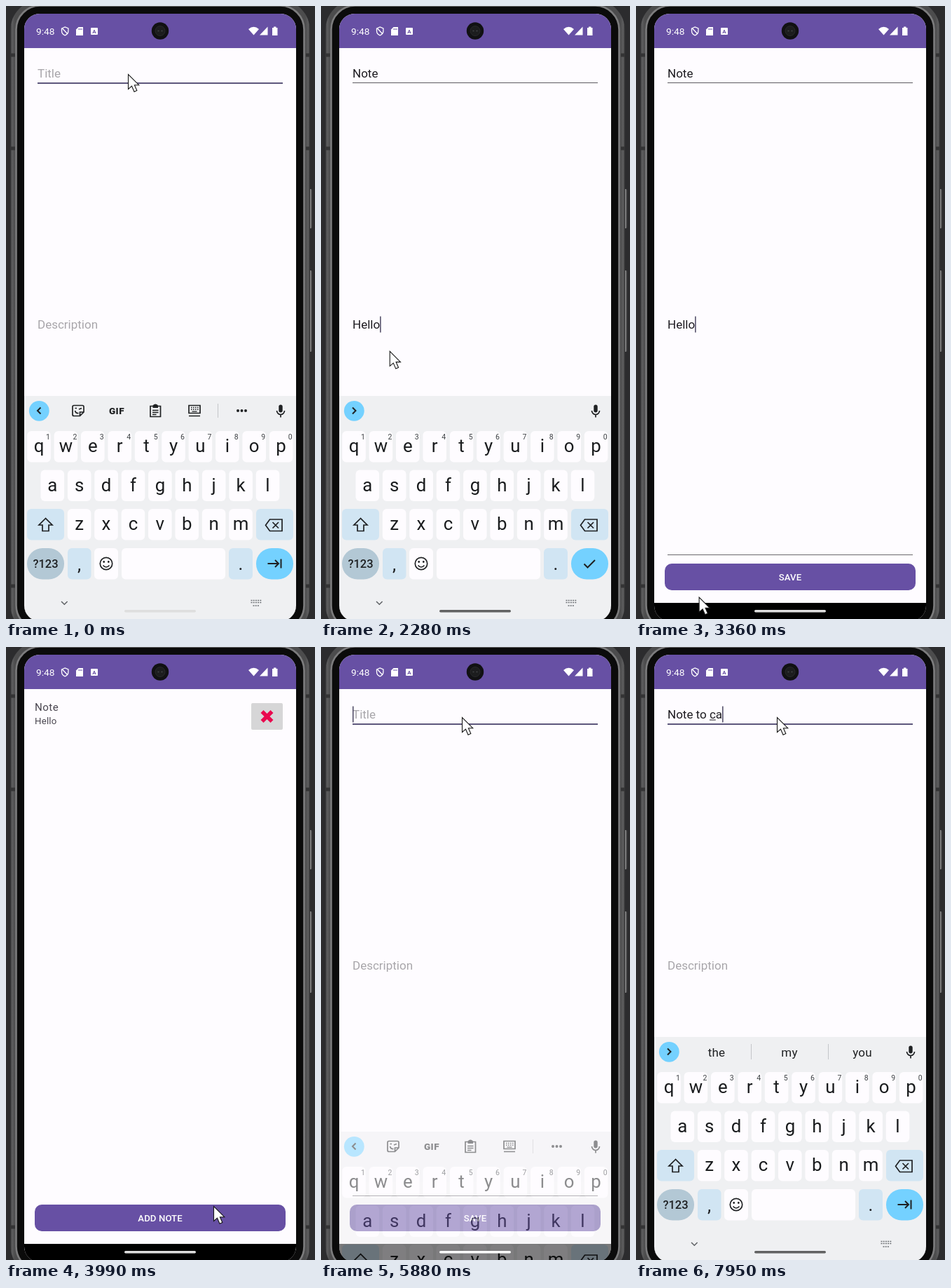
An HTML page that plays this animation: 441 px wide and 874 px high, repeating every 8000 ms.

```html
<!DOCTYPE html>
<html lang="en">
<head>
<meta charset="utf-8">
<title>Notes app</title>
<style>
  html, body { margin: 0; height: 100%; overflow: hidden; background: #2c2c2e; }
  svg { display: block; width: 441px; height: 874px; }
  text { font-family: Roboto, sans-serif; white-space: pre; }
  .mid { text-anchor: middle; }
  .field { font-size: 17px; }
  .btn { font-size: 13.2px; font-weight: 500; fill: #fff; letter-spacing: .1px; }
  .key { font-size: 25.8px; fill: #1a1c1e; }
  .num { font-size: 10.5px; fill: #3c4043; }
  .word { font-size: 17px; fill: #1f2123; letter-spacing: .2px; }
  .line { fill: none; stroke: #1f2123; stroke-width: 1.7; }
  .bold { stroke-width: 2; }
  .solid { fill: #1f2123; }
</style>
</head>
<body>
<svg viewBox="0 0 441 874">
  <defs>
    <linearGradient id="metal">
      <stop offset="0" stop-color="#2c2c2d"/>
      <stop offset=".006" stop-color="#5e5e5f"/>
      <stop offset=".016" stop-color="#4c4c4d"/>
      <stop offset=".984" stop-color="#4c4c4d"/>
      <stop offset=".994" stop-color="#5e5e5f"/>
      <stop offset="1" stop-color="#2c2c2d"/>
    </linearGradient>
    <linearGradient id="side">
      <stop offset="0" stop-color="#4a4a4b"/>
      <stop offset=".5" stop-color="#8a8a8b"/>
      <stop offset="1" stop-color="#303031"/>
    </linearGradient>
    <clipPath id="screen"><rect x="26" y="11" width="388" height="866" rx="22"/></clipPath>
  </defs>

  <!-- phone body -->
  <rect width="441" height="874" fill="#2c2c2e"/>
  <rect x="432" y="261" width="5" height="56" rx="2" fill="url(#side)"/>
  <rect x="432" y="377" width="5" height="116" rx="2" fill="url(#side)"/>
  <rect x="6" y="-9" width="428" height="906" rx="44" fill="url(#metal)"/>
  <path d="M7 70h6M7 203h6M7 827h6M428 70h6M428 203h6M428 827h6" stroke="#343435" stroke-width="5"/>
  <rect x="14.500" y="-.5" width="411" height="889" rx="34" fill="#0b0b0b" stroke="#7c7c7d" stroke-width="2.600"/>

  <g clip-path="url(#screen)">
    <rect x="26" y="11" width="388" height="866" fill="#fefcff"/>

    <g id="form">
      <text id="titleText" class="field" x="45" y="102"></text>
      <rect id="titleLine" x="45" width="350"/>
      <text id="descText" class="field" x="45" y="460"></text>
      <rect x="45" y="782" width="350" height="1" fill="#6b696d"/>
      <rect id="compose" height="1" fill="#1d1b20"/>
      <rect id="caret" width="1.5" height="23" fill="#4c4763"/>
      <rect x="41" y="795" width="358" height="38" rx="10" fill="#6750a4"/>
      <text class="btn mid" x="220" y="818.5">SAVE</text>
    </g>

    <g id="list">
      <rect x="26" y="60" width="388" height="800" fill="#fefcff"/>
      <text x="41" y="91" font-size="15.1" letter-spacing=".47" fill="#49454f">Note</text>
      <text x="41" y="110" font-size="13.2" letter-spacing=".25" fill="#49454f">Hello</text>
      <rect x="350" y="80" width="45" height="38" rx="2" fill="#d6d6d7"/>
      <path d="M365.5 92l14 14M379.5 92l-14 14" stroke="#e9084f" stroke-width="5.6"/>
      <rect x="41" y="795" width="358" height="38" rx="10" fill="#6750a4"/>
      <text class="btn mid" x="220" y="818.5">ADD NOTE</text>
    </g>
    <rect id="press" x="41" y="795" width="358" height="38" rx="10" fill="#fff" opacity=".18"/>

    <!-- status bar -->
    <rect x="26" y="11" width="388" height="49" fill="#6750a4"/>
    <text x="43" y="41" font-size="13.7" fill="#fff">9:48</text>
    <path d="M79.500 32l4.700-2 4.700 2v3.500c0 3-2 5.300-4.700 6.300-2.700-1-4.700-3.300-4.700-6.300zM80 31.500l8 8.500" fill="none" stroke="#fff" stroke-width="1.3"/>
    <path d="M103.500 30h6.500v12h-10v-8.500z" fill="#fff"/>
    <path d="M104 32v2M106 32v2M108 32v2" stroke="#6750a4"/>
    <rect x="121" y="31" width="10" height="10" rx="1" fill="#fff"/>
    <text class="mid" x="126" y="39" font-size="8" font-weight="700" fill="#6750a4">A</text>
    <path d="M346 33q7.500-6.500 15 0l-7.500 8.500zM362 41.500h11.500v-12zM380 31h2v-1.500h3.500V31h2v11H380z" fill="#fff"/>
    <circle cx="220" cy="35.500" r="12.200" fill="#111113"/>
    <circle cx="220" cy="35.500" r="7" fill="#1c1d1e" stroke="#28292a"/>
    <path d="M216.500 35.500h2M221.500 35.500h2" stroke="#434547" stroke-width="1.5"/>

    <rect x="26" y="851" width="388" height="26"/>

    <g id="kbd">
      <rect x="26" y="556" width="388" height="330" fill="#eff0f2"/>
      <circle cx="47.300" cy="577.300" r="14.400" fill="#74d1ff"/>
      <path id="arrow" class="line bold"/>
      <rect class="solid" x="389.300" y="568.500" width="5.400" height="11" rx="2.700"/>
      <path class="line" d="M386.500 577a5.500 5.500 0 0 0 11 0M392 582.500v4"/>

      <g id="tools">
        <path class="line" d="M97 569.500h12a2 2 0 0 1 2 2V579l-5.500 5.500H97a2 2 0 0 1-2-2v-11a2 2 0 0 1 2-2zM111 579h-5.500v5.500M98.500 577q1 4 5 3.500"/>
        <path class="line" d="M98.500 573.500h2.500M104 575l4-1.500"/>
        <text class="mid solid" x="158" y="582" font-size="13.500" font-weight="900" letter-spacing=".5">GIF</text>
        <path class="line" d="M206 570.500h14.500v15H206z"/>
        <path d="M209 576.500h8.500M209 579.500h8.500M209 582.500h5.500" stroke="#1f2123" stroke-width="1.300"/>
        <path class="solid" d="M209.500 573v-3.500q3.700-4 7.500 0v3.500z"/>
        <path class="line" d="M261 569.500h16v11h-16z"/>
        <path d="M264 572.500h11M264 575.300h11" stroke="#1f2123" stroke-width="1.500" stroke-dasharray="1.5 1.500"/>
        <path d="M265.500 578.200h7M261 584.500h16" stroke="#1f2123" stroke-width="1.300"/>
        <rect x="302" y="567" width="1" height="20" fill="#c4c6c9"/>
        <path d="M331 577h0M336.500 577h0M342 577h0" stroke="#1f2123" stroke-width="4" stroke-linecap="round"/>
      </g>
      <g id="words">
        <path d="M164.500 566v22M274.500 566v22" stroke="#c4c6c9"/>
        <text class="word mid" x="115" y="583.5"></text>
        <text class="word mid" x="219" y="583.5"></text>
        <text class="word mid" x="323" y="583.5"></text>
        <g id="emoji" fill="none" stroke="#df2f3b" stroke-width="2">
          <path d="M323.500 566v22" stroke="#c4c6c9" stroke-width="1"/>
          <circle cx="299.500" cy="577" r="8.500" fill="#3b3b3d"/>
          <path d="M293.500 578.500h11" stroke="#eee" stroke-width="2.500"/>
          <path d="M293.500 571l12 12"/>
          <circle cx="348" cy="577" r="8.500"/>
          <path d="M342 571l12 12"/>
        </g>
      </g>

      <g id="keys"></g>

      <path class="line" d="M56.500 730.500l-9.500 9.500h5v8.500h9V740h5z"/>
      <path class="line" d="M376.500 732h17.500v16.500h-17.500l-6-8.200zM380.500 736l8.500 8.500M389 736l-8.500 8.500"/>
      <text class="mid solid" x="56.500" y="801" font-size="16.500" font-weight="500">?123</text>
      <text class="mid key" x="104.500" y="805" font-size="22">,</text>
      <text class="mid key" x="335" y="804" font-size="22">.</text>
      <circle class="line" cx="143" cy="795" r="8.700"/>
      <path d="M139.700 792.500h0M146.300 792.500h0" stroke="#1f2123" stroke-width="2.800" stroke-linecap="round"/>
      <path class="line" d="M138.500 797.500q4.500 5 9 0"/>
      <path id="enter" class="line bold"/>

      <circle id="ripple" cx="83" cy="851" r="24.500" fill="#d5d6d8"/>
      <path d="M79 849l4.300 4.300 4.300-4.300" fill="none" stroke="#5f6266" stroke-width="1.500"/>
      <path d="M349.500 847.500h15M349.500 850.500h15M352.500 855h9" stroke="#6e7175" stroke-width="1.600" stroke-dasharray="2 1.200"/>
    </g>

    <rect id="pill" x="169" y="861" width="102" height="3.500" rx="1.700"/>
  </g>

  <path id="mouse" d="M.5 .5V21.500l5-4.300 3.500 8 3.800-1.700-3.400-7.800h6.300z" fill="#fff" stroke="#161616" stroke-width="1.100"/>
</svg>

<script>
const LOOP = 8000;
const $ = id => document.getElementById(id);
const set = (id, attrs) => { for (const k in attrs) $(id).setAttribute(k, attrs[k]); };
const show = (id, on) => { $(id).style.display = on ? '' : 'none'; };

const ticks = [0, 150, 270, 390, 690, 840, 990, 1110, 1260, 1620, 1740, 1890, 2010,
  2280, 2400, 2550, 2670, 2820, 2940, 3090, 3210, 3360, 3480, 3600, 3750, 3870, 3990,
  4230, 4380, 4530, 4650, 4920, 5040, 5190, 5340, 5460, 5610, 5760, 5880,
  6000, 6120, 6240, 6390, 6510, 6660, 6780, 7050, 7320, 7470, 7620, 7800, 7950];

const title = [[0, ''], [150, 'N'], [270, 'Not'], [390, 'Note'], [3990, ''],
  [6240, 'N'], [6390, 'Not'], [6510, 'Note'], [6780, 'Note '], [7320, 'Note t'],
  [7470, 'Note to'], [7620, 'Note to '], [7800, 'Note to c'], [7950, 'Note to ca']];
const desc = [[0, ''], [1620, 'H'], [1740, 'Hel'], [1890, 'Hell'], [2010, 'Hello'], [3990, '']];
const focus = [[0, 'title'], [1260, 'desc'], [3990, ''], [5880, 'title']];
// '*' is the toolbar, '' an empty strip, two words leave room for emoji
const strip = [[0, '*'], [150, ''], [270, 'No|Not|Now'], [390, 'Not|Note'], [1110, '*'],
  [1620, ''], [1740, 'He|Help|Her'], [2010, 'Hell|Hello|Hellos'], [2280, ''], [5880, '*'],
  [6240, ''], [6390, 'No|Not|Now'], [6510, 'Not|Note'], [7320, 'to|the|that'], [7620, 'the|my|you']];
const board = [[0, 0, 1], [3210, 70, .7], [3360, 135, 0], [5880, 135, .5], [6000, 12, .95], [6120, 0, 1]];
const list = [[0, 0], [3870, .6], [3990, 1], [5040, .5], [5190, 0]];
const pill = [[0, 222], [390, 98], [3210, 98], [3360, 222], [5760, 222], [5880, 250],
  [6000, 235], [6510, 182], [7050, 98]];
const mouse = [[0, 174, 97], [570, 174, 97], [1110, 101, 464], [2150, 101, 464], [2940, 56, 850],
  [3240, 56, 850], [3750, 296, 797], [4000, 296, 797], [4380, 398, 816], [4650, 349, 809],
  [5040, 349, 809], [5760, 201, 100]];

const held = (track, t) => track.findLast(k => k[0] <= t);
function tween(track, t, i, ease = u => u) {
  const n = track.findIndex(k => k[0] > t);
  if (n < 0) return track.at(-1)[i];
  const a = track[n - 1], b = track[n];
  return a[i] + (b[i] - a[i]) * ease((t - a[0]) / (b[0] - a[0]));
}
const smooth = u => u * u * (3 - 2 * u);

const pen = document.createElement('canvas').getContext('2d');
pen.font = '17px Roboto, sans-serif';
const widthOf = s => pen.measureText(s).width;

const PITCH = 38.4;
const key = (x, y, w, fill = '#fefcff', r = 6) =>
  `<rect x="${x}" y="${y}" width="${w}" height="44.500" rx="${r}" fill="${fill}"/>`;
function row(letters, cx, y, numbered) {
  return [...letters].map((c, i) => {
    const x = cx + i * PITCH;
    return key(x - 16.800, y, 33.600) +
      `<text class="key mid" x="${x}" y="${y + 30}">${c}</text>` +
      (numbered ? `<text class="num mid" x="${x + 13}" y="${y + 12}">${(i + 1) % 10}</text>` : '');
  }).join('');
}
$('keys').innerHTML =
  row('qwertyuiop', 47, 606, true) + row('asdfghjkl', 66.3, 661.5) + row('zxcvbnm', 104.6, 717) +
  key(30, 717, 53, '#d1e5f3') + key(357, 717, 53, '#d1e5f3') +
  key(30, 773, 53, '#b3c8d5', 22) + key(88, 773, 33.5, '#d1e5f3') + key(126, 773, 34) +
  key(165, 773, 148) + key(318, 773, 34, '#d1e5f3') + key(357, 773, 53, '#74d1ff', 22);

function drawField(id, value, hint) {
  $(id).textContent = value || hint;
  $(id).style.fill = value ? '#1d1b20' : '#a8a6aa';
}

function drawForm(t) {
  const text = { title: held(title, t)[1], desc: held(desc, t)[1] };
  const on = held(focus, t)[1], inTitle = on === 'title';
  drawField('titleText', text.title, 'Title');
  drawField('descText', text.desc, 'Description');
  set('titleLine', inTitle ? { y: 109, height: 2, fill: '#5d567c' } : { y: 109, height: 1, fill: '#5c5a60' });

  const value = text[on] || '', top = inTitle ? 84.5 : 442.5;
  show('caret', on && t >= 150);
  set('caret', { x: 45 + widthOf(value), y: top });

  const from = widthOf(value.slice(0, value.lastIndexOf(' ') + 1));
  const to = widthOf(value.slice(0, -1));
  const composing = to > from && (inTitle || t < 2280);
  show('compose', composing);
  if (composing) set('compose', { x: 45 + from, y: top + 19, width: to - from });
}

function drawKeyboard(t) {
  const [, dy, alpha] = held(board, t);
  set('kbd', { transform: `translate(0 ${dy})`, opacity: alpha });
  const mode = held(strip, t)[1], tools = mode === '*';
  show('tools', tools);
  show('words', !tools && mode);
  set('arrow', { d: tools ? 'M49.5 572.500l-4.500 4.500 4.500 4.500' : 'M45 572.500l4.500 4.500-4.500 4.500' });
  const words = mode.split('|');
  $('words').querySelectorAll('text').forEach((el, i) => { el.textContent = words[i] || ''; });
  show('emoji', words.length === 2);
  set('enter', { d: t >= 1260 && t < 5040
    ? 'M375.500 795.500l5 5 10.500-10.500'
    : 'M373.500 795h15M384 790l5 5-5 5M392.500 788.500v13' });
  show('ripple', t >= 2940 && t < 3360);
  set('ripple', { r: t < 3090 ? 17 : 24.5 });
}

function draw(now) {
  const t = ticks.findLast(k => k <= now);
  drawForm(t);
  drawKeyboard(t);
  set('list', { opacity: held(list, t)[1] });
  show('press', t === 3750 || t === 4920);
  const g = Math.round(tween(pill, t, 1));
  set('pill', { fill: `rgb(${g},${g},${g})` });
  set('mouse', { transform: `translate(${tween(mouse, t, 1, smooth)} ${tween(mouse, t, 2, smooth)})` });
}

function loop() {
  draw(performance.now() % LOOP);
  requestAnimationFrame(loop);
}
loop();
</script>
</body>
</html>
```
